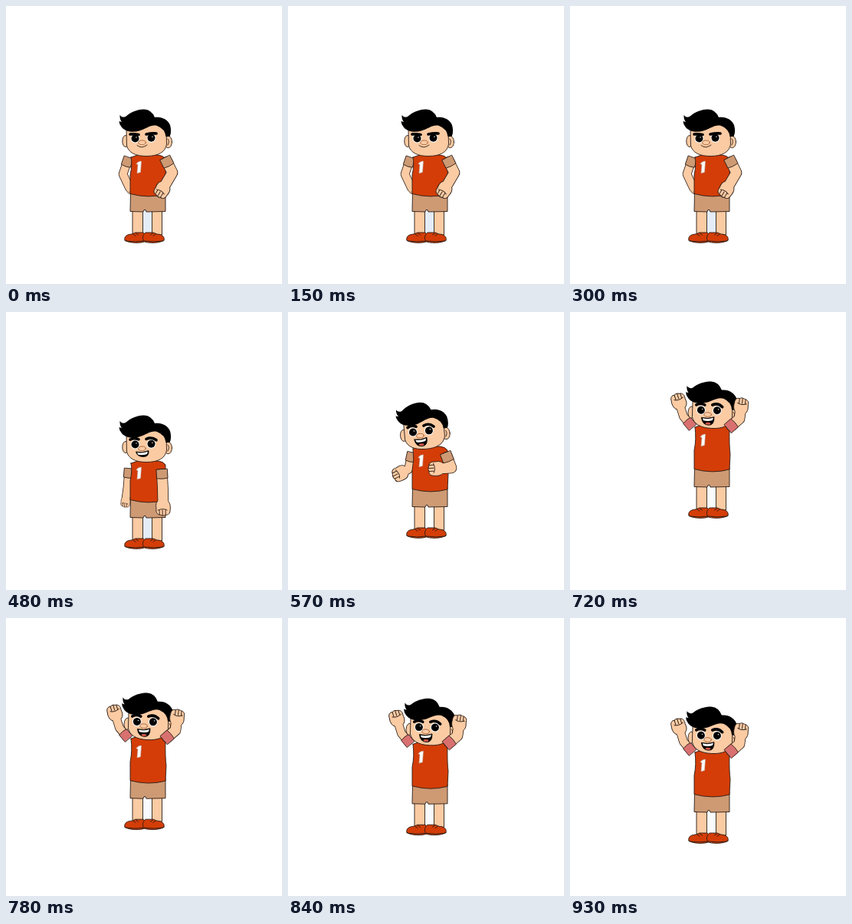
Write an HTML page that moves like this. It is 360x362 px and loops after 0.96 s.

```html
<!DOCTYPE html>
<html lang="en">
<head>
<meta charset="utf-8">
<title>Jump for joy</title>
<style>
  html, body { margin: 0; width: 100%; height: 100%; overflow: hidden; background: #fff; }
  svg { display: block; width: 100%; height: 100%; }
  .line { stroke: #2a1c16; stroke-width: .9; stroke-linejoin: round; stroke-linecap: round; }
  .skin { fill: #fbcba3; }
  .tan { fill: #cd9a74; }
  .red { fill: #d43d08; }
  .none { fill: none; }
  .limb { fill: none; stroke-linejoin: round; stroke-linecap: round; }
  .brow { fill: none; stroke: #000; stroke-width: 3.6; stroke-linecap: round; }
</style>
</head>
<body>
<svg viewBox="0 0 360 362">
  <defs>
    <g id="fist">
      <path class="skin line" d="M-8-6C-6-9-1-10 4-9C9-9 11-6 10-3C12-1 11 2 10 4C10 8 6 10 2 9C-3 10-7 9-9 6"/>
      <path class="none line" d="M10-3L4-3M10.5 1L4 1M9.5 5L4 5M4-5Q1 0 4 7"/>
    </g>
    <g id="eye">
      <ellipse rx="5.9" ry="6.1" fill="#fff"/>
      <circle r="5"/>
      <circle cx="1.5" cy="-1.5" r=".7" fill="#fff"/>
    </g>
    <g id="shoe">
      <path class="red line" d="M155 305C153.500 300 158 297.300 164 297L169 295L179 295C183 298 183.500 303 181 306.500C178 309 160 309.500 155 305Z"/>
      <path class="none line" d="M156 306Q168 307.800 181 306M166 297.200l3 2M169.500 296l3 2"/>
    </g>
  </defs>
  <g id="body">
    <g id="left"></g>
    <rect id="gap" x="179" y="266" width="11.500" height="35" fill="#e4ecf8"/>
    <path class="skin line" d="M165 264V298H178.500V264M190.500 264V298H203.500V264"/>
    <use href="#shoe"/>
    <use href="#shoe" transform="matrix(-1 0 0 1 361 0)"/>
    <path class="tan line" d="M162.500 242L162 267.500L179 268L180 265.500H182L183 268L208 267.500V242Z"/>
    <path id="shirt" class="red line"/>
    <path id="one" d="M169.800 205.500Q173 201.500 176.500 202L175.500 216.500L171 217.800L172 206.500Z" fill="#fff" stroke="#b9aaa2" stroke-width=".6"/>
    <g id="head">
      <ellipse class="skin line" cx="156" cy="176" rx="4.200" ry="7.500"/>
      <ellipse class="skin line" cx="211.500" cy="177" rx="5" ry="7.700"/>
      <path class="skin line" d="M157 160L157.500 182C160 191 169 195.500 183 195.500C199 195.500 208 190 209.500 180L209 160L201 150H165Z"/>
      <path class="none line" d="M211 173q3 3 0 8"/>
      <use href="#eye" x="168.500" y="172.500"/>
      <use href="#eye" x="189.500" y="171.800"/>
      <path id="browL" class="brow"/>
      <path id="browR" class="brow"/>
      <ellipse class="skin line" cx="177.500" cy="177.800" rx="4.800" ry="2.800" style="stroke:#a5643c"/>
      <path id="smile" class="none line" d="M171 181.500Q177 186.500 184 181"/>
      <g id="mouth">
        <path id="lips" stroke="#000" stroke-width=".8" stroke-linejoin="round"/>
        <path d="M171 183Q178 184.500 185 181.700L184 185Q178 187 172.300 185.800Z" fill="#fff"/>
        <ellipse id="tongue" cx="178.500" rx="3.500" ry="1.500" fill="#d0564a"/>
      </g>
      <path d="M148.500 142Q151 146 156 144C163 138 170 135 180 134.500Q190 135 194 145C203 143.500 211 148 214 155Q216.500 164 213.500 170L208.500 170Q207.500 160 197 156C189 154 183 160 174 162.500C166 165 156 164 151 158Q147.500 154 147.500 150L151 151Q148 147 148.500 142Z"/>
    </g>
    <g id="right"></g>
  </g>
</svg>
<script>
const LOOP = 960, STEP = 30;
const $ = id => document.getElementById(id);
const set = (el, attrs) => { for (const k in attrs) el.setAttribute(k, attrs[k]); };
const mix = (a, b, k) => a + (b - a) * k;

// l, r: shoulder, elbow, hand as x,y pairs. head: x, y, turn.
const rest = { head: [0, 0, 0], l: [158, 203, 152.5, 219, 162, 239], r: [210, 203, 217, 217, 204, 239],
               size: [.5], open: [0], brow: [0], gap: [1], pink: [0], lift: [0] };
const down = { head: [0, 0, 0], l: [160, 210, 158.5, 228, 156, 247], r: [203.5, 211, 204.5, 230, 205, 254],
               size: [.65], open: [8], brow: [.8], gap: [1], pink: [0], lift: [0] };
const wind = { head: [-5, -3, -4], l: [160.5, 203, 157, 219, 147, 224], r: [207.5, 203, 213, 217, 194, 218],
               size: [1], open: [11], brow: [1], gap: [0], pink: [0], lift: [.7] };
const cheer = { head: [2, -4, 3], l: [156, 185.5, 148, 176, 142, 157], r: [210.5, 188, 221, 179, 223, 163],
                size: [1], open: [11], brow: [1], gap: [.25], pink: [1], lift: [1] };
const poses = [[0, rest], [300, rest], [480, down], [570, wind], [660, cheer], [LOOP, cheer]];
const heights = [[0, 0], [480, 0], [570, -14], [660, -51], [720, -40], [930, -15], [LOOP, -11]];
const holds = [0, 480, 570, 720];   // drawings that stay for two steps

function span(keys, t) {
  const i = keys.findIndex(k => k[0] > t);
  const [t0, a] = keys[i - 1], [t1, b] = keys[i];
  return [a, b, (t - t0) / (t1 - t0)];
}

function poseAt(t) {
  const [a, b, k] = span(poses, t), out = {};
  for (const key in a) out[key] = a[key].map((v, i) => mix(v, b[key][i], k));
  return out;
}

function makeArm(id, width, cuff) {
  $(id).innerHTML = `<path class="limb" stroke="#2a1c16" stroke-width="${width + 1.6}"/>
    <use href="#fist"/>
    <path class="limb" stroke="#fbcba3" stroke-width="${width}"/>
    <path class="line"/>`;
  const [edge, fist, flesh, sleeve] = $(id).children;
  return ([sx, sy, ex, ey, hx, hy], size, pink) => {
    const turn = Math.atan2(hy - ey, hx - ex);
    const wx = hx - Math.cos(turn) * 5 * size, wy = hy - Math.sin(turn) * 5 * size;
    const d = `M${sx} ${sy}L${ex} ${ey}L${wx} ${wy}`;
    set(edge, { d });
    set(flesh, { d });
    set(fist, { transform: `translate(${hx} ${hy}) rotate(${turn * 180 / Math.PI}) scale(${size})` });
    const a = Math.atan2(ey - sy, ex - sx), c = Math.cos(a), s = Math.sin(a);
    const corner = (u, v) => `${sx + u * c - v * s} ${sy + u * s + v * c}`;
    const w = cuff / 2;
    set(sleeve, {
      d: `M${corner(-6, -w)}L${corner(5.5, -w)}Q${corner(7, 0)} ${corner(5.5, w)}L${corner(-6, w)}Z`,
      fill: `rgb(${mix(205, 217, pink)},${mix(154, 112, pink)},${mix(116, 112, pink)})`
    });
  };
}
const leftArm = makeArm('left', 10, 12.5), rightArm = makeArm('right', 13, 14.5);

function draw(t) {
  const p = poseAt(t), [y0, y1, k] = span(heights, t);
  const [x, y, turn] = p.head, [b] = p.brow, [open] = p.open, [lift] = p.lift;
  set($('body'), { transform: `translate(0 ${mix(y0, y1, k)})` });
  set($('head'), { transform: `translate(${x} ${y}) rotate(${turn} 183 180)` });
  leftArm(p.l, p.size[0], p.pink[0]);
  rightArm(p.r, 1, p.pink[0]);

  const top = 197 - 7 * lift;
  set($('shirt'), { d: `M163 ${top}Q170 ${top - 3.5} 178 ${top - 3}H198Q205 ${top - 2.5} 208 ${top + 2}` +
    `Q207.5 215 209 225L208 245Q186 251 162 244.5V220Q165 206 163 ${top}Z` });
  set($('one'), { transform: `translate(0 ${-3 * lift})` });
  set($('gap'), { opacity: p.gap[0] });

  set($('browL'), { d: `M162 ${167 - b}Q167 ${166.5 - 4 * b} 173 ${167.5 - 2 * b}` });
  set($('browR'), { d: `M183 ${167 - 2 * b}Q190 ${165.5 - 4 * b} 196 ${166 + b}` });
  const talk = open > 3;
  set($('smile'), { visibility: talk ? 'hidden' : 'visible' });
  set($('mouth'), { visibility: talk ? 'visible' : 'hidden' });
  const chin = 180.5 + open;
  set($('lips'), { d: `M169.5 182Q178 184 186 180.5Q187 ${chin} 179 ${chin}Q171 ${chin} 169.5 182Z` });
  set($('tongue'), { cy: chin - 2, opacity: open > 9 ? 1 : 0 });
}

function tick() {
  let t = Math.floor(performance.now() % LOOP / STEP) * STEP;
  if (holds.includes(t - STEP)) t -= STEP;
  draw(t);
  requestAnimationFrame(tick);
}
tick();
</script>
</body>
</html>
```
